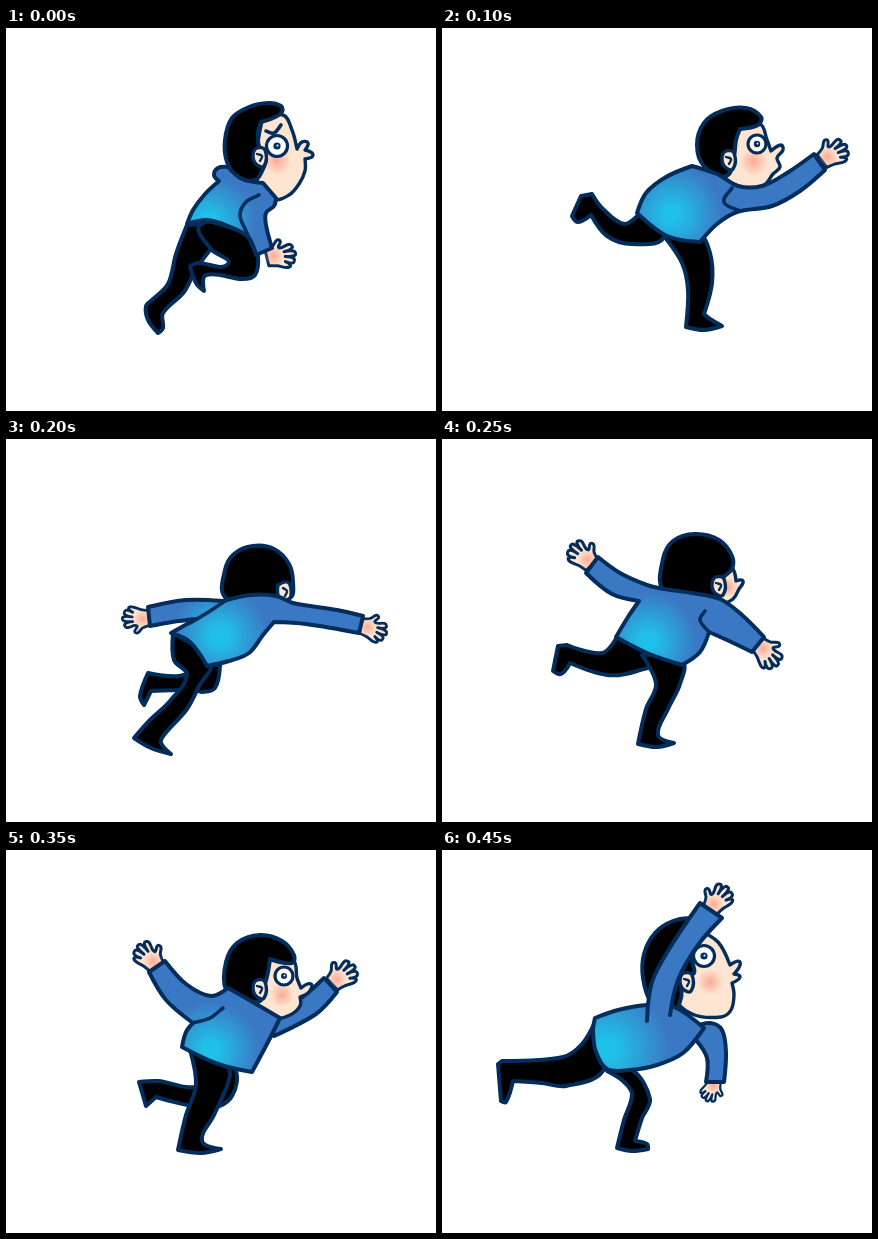
An HTML page with a canvas that plays this animation: 430 px wide and 383 px high, repeating every 500 ms.

```html
<!DOCTYPE html>
<html lang="en">
<head>
<meta charset="utf-8">
<title>Runner</title>
<style>
html, body { margin: 0; width: 100%; height: 100%; overflow: hidden; background: #fff; }
canvas { display: block; width: 430px; height: 383px; }
</style>
</head>
<body>
<canvas id="stage"></canvas>
<script>
const W = 430, H = 383, STEP = 50;
const INK = '#032d5b', BLUE = '#3b78c3', CYAN = '#20c1e8', SKIN = '#fee5d2';
const canvas = document.getElementById('stage');
const ctx = canvas.getContext('2d');
const dpr = window.devicePixelRatio || 1;
canvas.width = W * dpr;
canvas.height = H * dpr;
let shirt = BLUE;

// Smooth curve through "x,y" points; a trailing "!" makes a sharp corner.
function curve(text, closed) {
  const pts = text.split(' ').map(s => {
    const [x, y] = s.split(',').map(parseFloat);
    return { x, y, sharp: s.endsWith('!') };
  });
  const n = pts.length;
  const at = i => pts[closed ? (i + n) % n : Math.max(0, Math.min(n - 1, i))];
  const handle = (i, dir) => {
    const p = at(i), a = at(i - 1), b = at(i + 1), q = at(i + dir);
    if (p.sharp) return [p.x, p.y];
    const k = dir * 0.33 * Math.hypot(q.x - p.x, q.y - p.y) / (Math.hypot(b.x - a.x, b.y - a.y) || 1);
    return [p.x + (b.x - a.x) * k, p.y + (b.y - a.y) * k];
  };
  const path = new Path2D();
  path.moveTo(pts[0].x, pts[0].y);
  for (let i = 0; i < (closed ? n : n - 1); i++) {
    const end = at(i + 1);
    path.bezierCurveTo(...handle(i, 1), ...handle(i + 1, -1), end.x, end.y);
  }
  if (closed) path.closePath();
  return path;
}

function shape(text, fill, width, closed = true) {
  const path = curve(text, closed);
  if (fill) {
    ctx.fillStyle = fill;
    ctx.fill(path);
  }
  ctx.lineWidth = width;
  ctx.stroke(path);
}

const black = text => shape(text, '#000', 4);
const blue = text => shape(text, shirt, 4);
const sleeve = text => shape(text, shirt, 4, false);
const skin = text => shape(text, SKIN, 3.4);
const line = (text, width = 3.6) => shape(text, null, width, false);

function glow(x, y, r) {
  shirt = ctx.createRadialGradient(x, y, r * 0.15, x, y, r);
  shirt.addColorStop(0, CYAN);
  shirt.addColorStop(1, BLUE);
}

function oval(x, y, rx, ry, fill) {
  ctx.beginPath();
  ctx.ellipse(x, y, rx, ry, 0, 0, Math.PI * 2);
  ctx.fillStyle = fill;
  ctx.fill();
}

function blush(x, y, r = 14) {
  const g = ctx.createRadialGradient(x, y, 0, x, y, r);
  g.addColorStop(0, 'rgba(250,150,125,.75)');
  g.addColorStop(1, 'rgba(250,150,125,0)');
  oval(x, y, r, r, g);
}

function eye(x, y, rx, ry = rx, pupil = 3.6) {
  oval(x, y, rx, ry, '#fff');
  ctx.lineWidth = 3.2;
  ctx.stroke();
  oval(x, y, pupil, pupil, INK);
  oval(x + 0.5, y - 0.5, pupil * 0.3, pupil * 0.3, '#fff');
}

function ear(x, y) {
  skin(`${x + 5},${y - 7} ${x - 3},${y - 9} ${x - 7},${y - 2} ${x - 4},${y + 7} ${x + 4},${y + 9}`);
  line(`${x - 3},${y - 3} ${x + 2},${y - 1} ${x},${y + 4}`, 2.4);
}

// Wrist position, pointing direction in degrees, flip = -1 swaps the thumb side.
function hand(x, y, angle, flip = 1, size = 1) {
  ctx.save();
  ctx.translate(x, y);
  ctx.rotate(angle * Math.PI / 180);
  ctx.scale(size, size * flip);
  shape('0,-8! 8,-10 14,-15 17,-13 14,-7 25,-8 27,-4 18,-2! 28,0 28,4 18,3! 26,7 24,11 17,8! 21,13 17,14 8,10 0,8!', SKIN, 3);
  blush(7, 0, 10);
  ctx.restore();
}

const poses = [
  () => {
    glow(202, 194, 48);
    black('181,197! 170,226 162,256 146,272 140,278 142,292 152,305! 157,300 157,285 178,264 190,241 204,222 220,203');
    black('194,197 226,200 246,211 252,228 249,247 236,251 200,247 198,263! 190,255 184,238! 192,235 222,236 205,221');
    skin('256,93! 277,87 286,102 291,121! 296,114 302,115 299,122! 307,127 299,131! 299,143 293,156 283,167 268,171 250,150 252,115');
    blush(271, 133);
    black('249,152 232,149 221,134 219,112 226,90 243,79 262,75 275,78 276,84 267,90 255,94! 252,104 253,118 260,130 256,143');
    ear(254, 129);
    eye(271, 118, 10.5);
    line('260,103 268,105 275,97');
    hand(261, 230, -14);
    blue('181,196! 187,182 199,166 213,153! 208,147 212,140 222,139! 236,151 257,155! 270,170! 268,178 260,185 260,197 266,220! 250,227! 242,209 222,198 201,192');
    line('253,167 240,174 234,187 240,203 250,226');
  },
  () => {
    glow(224, 181, 48);
    black('193,184! 180,208 160,207 140,205! 131,206! 129,235! 135,237 145,221! 165,225 188,226 206,219 222,203');
    black('218,203! 246,222 261,245 268,270 272,291! 290,292 310,289! 297,285 285,283! 286,250 277,225 255,200');
    skin('278,97! 299,92 306,106 311,121! 318,121 324,115 325,121 319,129 317,137 321,142 329,142 328,147 320,148 312,156 297,160 281,157 270,142');
    blush(294, 133);
    black('277,147 254,136 242,114 246,93 262,79 281,75 296,79 299,87 290,93 279,97! 275,108 276,122 272,138');
    ear(267, 127);
    eye(294, 116, 9.5, 9.5, 3.2);
    line('282,103 290,102 296,97');
    hand(340, 191, -12);
    blue('191,184! 196,167 214,149 242,136! 268,146! 277,156 288,163! 284,173! 300,182 337,183! 338,201! 310,201 283,195 263,186! 252,205! 222,189');
    line('264,147 273,160 287,164');
    line('284,173 268,163 258,181 263,187');
  },
  () => {
    glow(230, 186, 50);
    black('197,186! 182,196 160,180 150,166! 139,168! 130,188! 136,194 149,187! 165,208 190,216 222,208');
    black('222,208! 240,235 246,262 244,299! 262,302 280,298! 268,291 262,286! 270,255 268,225 256,205');
    skin('297,100! 318,96 325,112 329,123! 339,117 341,122 335,130 338,139 331,146 322,157 303,160 282,146');
    blush(312, 134);
    black('284,148 262,138 255,117 262,95 280,83 304,80 319,89 316,97 298,101! 294,112 292,128');
    ear(287, 132);
    eye(315, 116, 9, 9, 3.2);
    hand(380, 133, -37);
    blue('195,185! 204,165 224,149 250,138! 275,146 296,158 320,158 345,145 372,126! 383,142! 358,163 330,178 295,184 275,196 258,214! 225,208');
    line('298,183 282,174 290,160');
  },
  () => {
    glow(229, 197, 50);
    black('193,112! 225,131! 211,160 200,188 207,206! 186,204 172,198! 185,165 203,134!');
    black('225,221! 232,250 230,286 224,296! 230,301 238,302 251,307! 250,299 245,290 254,262 252,223');
    skin('326,107! 336,105 330,122 318,134 302,142 300,125');
    blush(325, 118, 10);
    black('260,138 262,115 275,98 299,87 325,91 336,101 334,108 324,109! 318,119 313,131! 307,127 303,146 283,147');
    ear(303, 134);
    hand(367, 79, -60);
    blue('255,138! 276,143 302,147! 329,127 345,97 356,71! 376,87! 367,107 349,132 325,153 297,167! 286,191 265,215 244,226 229,221 211,204 199,185 214,166 236,148');
    line('292,148 302,147 315,139');
  },
  () => {
    glow(214, 197, 48);
    black('214,226! 209,249 196,253 188,251 145,252! 138,266! 134,257 142,234! 173,237 205,226');
    black('167,195! 168,221 181,236 164,262 144,281 128,299! 145,309 165,315! 155,304 158,296 181,270 193,247 205,222');
    black('219,158 219,131 228,115 247,107 268,110 283,125 287,143 284,159 250,163');
    skin('272,146! 281,143 285,150 283,160 273,158');
    line('277,149 281,152 279,157', 2.4);
    hand(143, 179, 174, 1, 0.92);
    hand(355, 187, 12, 1, 0.92);
    blue('217,162! 180,161 142,168! 144,187! 166,183 190,180! 165,194! 184,203 201,227! 223,222 243,214 257,196 268,183! 300,185 353,194! 357,177! 331,171 287,164 270,157 244,156');
    line('184,184 201,174 219,162');
  },
  () => {
    glow(206, 202, 48);
    black('175,198! 160,214 125,206! 116,207! 111,232! 119,235 128,224! 165,236 195,232 220,218');
    black('200,216! 214,245 204,270 196,305! 215,308 232,304! 216,296 226,270 238,245 240,222');
    skin('283,126! 291,130 294,142! 301,142 297,150 291,160 280,163 272,148');
    blush(286, 148, 10);
    black('221,151 221,120 231,102 253,95 277,101 290,117 290,130 281,139 279,155 250,159');
    ear(277, 147);
    hand(150, 126, -132, -1);
    hand(316, 205, 43);
    blue('222,150! 250,154 278,160 300,176 322,198! 310,213! 285,201 267,193! 258,213 240,226! 205,214 174,198! 186,178 197,162! 170,155 144,134! 156,118! 178,134 205,146');
    line('267,193 258,181 263,172');
  },
  () => {
    glow(204, 200, 48);
    black('203,221! 215,248 216,301! 240,300 254,296! 237,290! 235,274 240,245 238,220');
    black('181,196! 161,196 152,177 145,158! 126,153 105,154! 128,163 142,190 157,219! 185,223 215,221 232,210');
    skin('276,108! 291,117 296,135! 308,128 310,132 300,143! 302,149 293,152 288,153 282,160 270,158 260,140');
    blush(285, 142, 12);
    black('224,142 225,111 235,93 258,85 281,91 293,107 292,116 276,108! 278,118 272,128 272,143 262,150 244,149');
    ear(271, 135);
    oval(288, 125, 2.2, 3.2, INK);
    hand(186, 82, -86, -1);
    hand(243, 223, 118, 1, 0.85);
    blue('175,84! 196,84! 200,125! 222,137! 238,147 259,148! 277,163! 271,194 253,230! 232,220! 212,208 181,196! 191,171 210,150! 174,135!');
    line('200,125 211,132 222,137');
    line('256,162 252,190 233,219');
  },
  () => {
    glow(205, 200, 48);
    black('200,213! 228,218 226,246 205,258 150,247! 140,256! 133,232! 152,231 192,236');
    black('184,200! 190,235 180,265 172,300! 195,303 215,299! 196,291 208,265 224,225 216,211');
    hand(326, 134, -43);
    blue('262,166! 295,148 318,128! 331,142! 310,164 268,186!');
    skin('264,108! 287,110 291,128 295,138! 305,134 303,142 294,147! 294,156 284,165 268,168 250,148');
    blush(276, 145, 12);
    black('220,140 220,112 231,93 254,85 276,91 288,105 286,113 264,109! 262,122 259,134 254,151 236,148');
    ear(254, 139);
    eye(278, 126, 9, 9, 3);
    hand(151, 117, -126, -1);
    blue('222,138! 245,151 274,168! 262,192 246,222! 212,214 176,197! 180,182 187,173! 160,150 143,122! 159,111! 180,134 205,146');
    line('187,173 204,168 217,158');
  },
  () => {
    glow(207, 187, 46);
    black('165,219! 153,218 147,222 155,228 168,228');
    black('198,222! 212,230 209,271! 192,264 183,250 190,226');
    black('168,197! 158,226 148,265 122,288 109,301! 130,301 151,303! 152,297 138,292! 164,266 178,247 192,222');
    hand(325, 68, -34, -1);
    blue('264,98! 285,70 322,60! 328,78! 302,92 280,109!');
    skin('252,107! 284,108! 284,126 283,140 279,152! 268,147 259,147! 260,154 272,160 272,167 262,175 240,153');
    blush(253, 148, 12);
    black('214,134 213,111 225,94 245,86 268,90 283,102 283,109 252,107! 249,121 249,136 242,151 228,147');
    ear(239, 143);
    eye(265, 131, 14, 9.5, 2.8);
    hand(133, 154, -168, -1);
    blue('135,147! 163,155 189,153 208,133! 235,151 263,177! 244,197 236,214 228,229! 200,222 178,207 168,194 172,180! 150,176 130,163!');
    line('172,180 199,179 227,172');
    line('189,154 198,153 206,150');
  },
  () => {
    glow(165, 199, 62);
    black('153,172! 140,194 121,207 60,211! 56,214! 59,251! 64,252 71,231! 100,233 124,236 162,219');
    black('165,221! 181,231 190,244 182,270 175,298! 190,301 206,299! 205,294 193,291! 200,268 208,249 190,220');
    skin('256,80! 276,92 288,115! 298,112 292,124! 298,127 290,133! 292,145 289,160 279,167 250,164 232,145 240,100');
    blush(268, 132, 13);
    black('228,166 209,152 201,128 202,104 213,83 231,71 250,69 266,80 256,91 250,110 252,123 240,128 239,148');
    ear(245, 132);
    eye(262, 106, 10.5);
    hand(273, 231, 108, 1, 0.75);
    blue('250,178! 268,173 280,180 284,203 282,232! 264,232! 265,208 254,190!');
    blue('153,168! 176,160 206,155 232,157 262,178! 241,203 215,215 188,220 165,219 154,202 151,181');
    hand(268, 60, -57);
    sleeve('205,171! 210,132 229,96 258,53! 280,68! 256,95 236,130 228,165!');
  }
];

const start = performance.now();
let shown = -1;

function draw() {
  const i = Math.floor((performance.now() - start) / STEP) % poses.length;
  if (i !== shown) {
    shown = i;
    ctx.setTransform(dpr, 0, 0, dpr, 0, 0);
    ctx.fillStyle = '#fff';
    ctx.fillRect(0, 0, W, H);
    ctx.strokeStyle = INK;
    ctx.lineJoin = ctx.lineCap = 'round';
    poses[i]();
  }
  requestAnimationFrame(draw);
}
draw();
</script>
</body>
</html>
```
